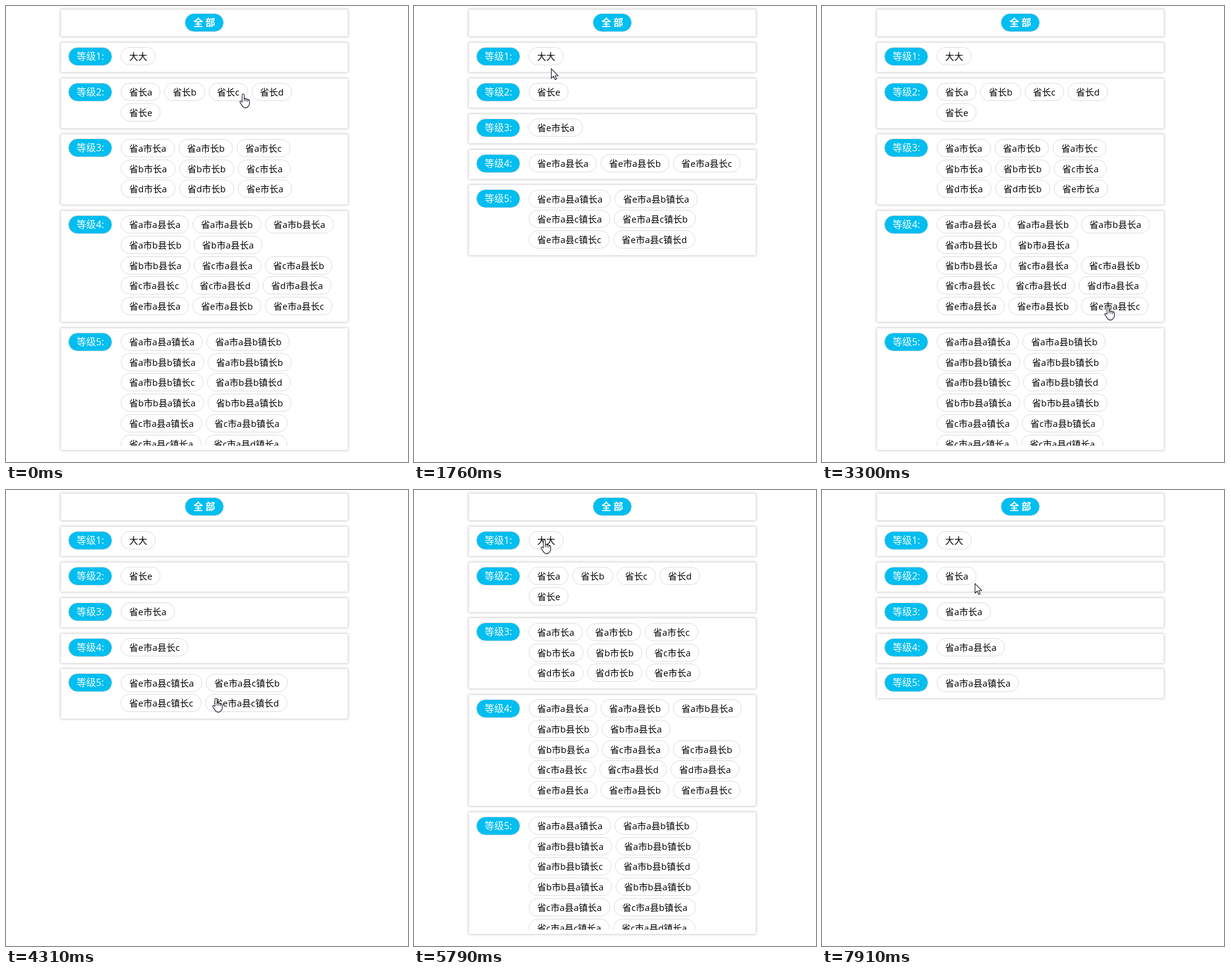
An HTML page that plays this animation: 666 by 754 pixels, repeating every 8 s.

```html
<!DOCTYPE html>
<html lang="zh-CN">
<head>
<meta charset="utf-8">
<style>
html, body { margin: 0; width: 100%; height: 100%; overflow: hidden; background: #fff; }
body { font: 15px/28px "Open Sans", "Noto Sans CJK SC", "Noto Sans CJK", sans-serif; color: #000; position: relative; display: flow-root; }
.card { position: relative; box-sizing: border-box; width: 475px; margin: 0 0 10.79px 91px; padding: 7.32px 0 7px; background: #fff; box-shadow: 0 0 4px 1px #ccc; }
.card.top { height: 44px; margin: 6px 0 11px 91px; padding: 6px 0; text-align: center; }
.list { display: flex; flex-wrap: wrap; align-content: flex-start; column-gap: 6px; width: 354px; max-height: 187px; margin-left: 99px; overflow: hidden; }
.chip, .label { box-sizing: border-box; height: 30px; padding: 0 13px; border: 1px solid #ddd; border-radius: 15px; white-space: nowrap; }
.chip { margin-bottom: 3.75px; }
.label { display: inline-block; vertical-align: top; height: 31px; border-radius: 15.5px; background: #01bef0; color: #fff; font-size: 16px; line-height: 29px; }
.list + .label { position: absolute; left: 12px; top: 7px; }
.top .label { font-weight: bold; }
#cursor { position: absolute; left: 0; top: 0; overflow: visible; pointer-events: none; fill: #fff; stroke: #1c1c28; stroke-width: 1.1; stroke-linejoin: round; }
</style>
</head>
<body>
<div class="card top"><span class="label">全 部</span></div>
<svg id="cursor" width="20" height="26">
  <path id="arrow" d="M.5 .7V16.6L4.2 13.2L6.7 18.8L9.1 17.7L6.7 12.3H11.8Z"/>
  <g id="hand" transform="translate(-5 0)">
    <path d="M4.2 14V2.2a1.7 1.7 0 0 1 3.4 0V8.2q1.7-1 3.1.6q1.8-.8 2.9.9q2.4-.4 2.8 1.7V16q0 2.8-1.8 4.6q-1.4 2.8-4.8 2.8q-3.2 0-5-2.8L.9 14.6q-.8-1.6.6-2.3q1.5-.3 2.7 1.7Z"/>
    <path d="M7.6 8V12.4M10.7 8.8V12.8M13.6 9.7V13.2" fill="none"/>
  </g>
</svg>
<script>
const LOOP = 8000;
const STEP = 64;
const UNITS = '省市县镇';
// Tips of the tree: each letter picks a branch, and the prefixes are the parents.
const tips = ('aaaa aabb aba abba abbb abbc abbd ac baa bbaa bbab caaa caba caca cada ' +
  'daa db eaaa eaba eaca eacb eacc eacd').split(' ');

const clicks = [
  { at: 0, code: '' }, { at: 1040, code: 'e' }, { at: 2340, code: '' },
  { at: 3680, code: 'eac' }, { at: 5740, code: '' }, { at: 7340, code: 'aaaa' },
];
const moves = [
  { at: 0, steps: 1, to: [392, 145] },
  { at: 50, steps: 7, to: [216, 177] },
  { at: 600, steps: 4, to: [219, 170] },
  { at: 1125, steps: 16, to: [222, 87] },
  { at: 2590, steps: 12, to: [473, 496] },
  { at: 3910, steps: 13, to: [276, 315] },
  { at: 4760, steps: 13, to: [215, 82] },
  { at: 5805, steps: 12, to: [413, 563] },
  { at: 6570, steps: 10, to: [276, 555] },
  { at: 7411, steps: 8, to: [253, 154] },
];

const cursor = document.getElementById('cursor');
const arrow = document.getElementById('arrow');
const hand = document.getElementById('hand');
const chips = [];

function add(parent, className, text = '') {
  const el = document.createElement('div');
  el.className = className;
  el.textContent = text;
  parent.append(el);
  return el;
}

function title(code) {
  if (!code) return '大大';
  return [...code].map((c, i) => UNITS[i] + (i === code.length - 1 ? '长' : '') + c).join('');
}

for (let depth = 0; depth <= UNITS.length; depth++) {
  const card = add(document.body, 'card');
  const list = add(card, 'list');
  add(card, 'label', `等级${depth + 1}:`);
  const codes = new Set(tips.filter(tip => tip.length >= depth).map(tip => tip.slice(0, depth)));
  for (const code of codes) chips.push({ code, el: add(list, 'chip', title(code)) });
}
document.body.append(cursor);

let selected = null;
function select(code) {
  if (code === selected) return;
  selected = code;
  for (const chip of chips) {
    const related = chip.code.startsWith(code) || code.startsWith(chip.code);
    chip.el.style.display = related ? '' : 'none';
  }
}

// The pointer slows towards each stop, and upward moves bow to one side.
function pointerAt(t) {
  let x = 0, y = 0;
  for (const { at, steps, to } of moves) {
    if (t < at) break;
    const progress = Math.min(1, (Math.floor((t - at) / STEP) + 1) / steps);
    const u = 1 - (1 - progress) ** 1.7;
    const dx = to[0] - x, dy = to[1] - y;
    const bow = dy < 0 ? 0.13 * Math.sin(Math.PI * u) : 0;
    x += dx * u - dy * bow;
    y += dy * u + dx * bow;
  }
  return [Math.round(x), Math.round(y)];
}

function draw(t) {
  select(clicks.findLast(({ at }) => at <= t).code);
  const [x, y] = pointerAt(t);
  const onChip = document.elementFromPoint(x, y)?.className === 'chip';
  hand.style.display = onChip ? '' : 'none';
  arrow.style.display = onChip ? 'none' : '';
  cursor.style.transform = `translate(${x}px, ${y}px)`;
}

const begin = performance.now();
function frame() {
  draw((performance.now() - begin) % LOOP);
  requestAnimationFrame(frame);
}
frame();
</script>
</body>
</html>
```
